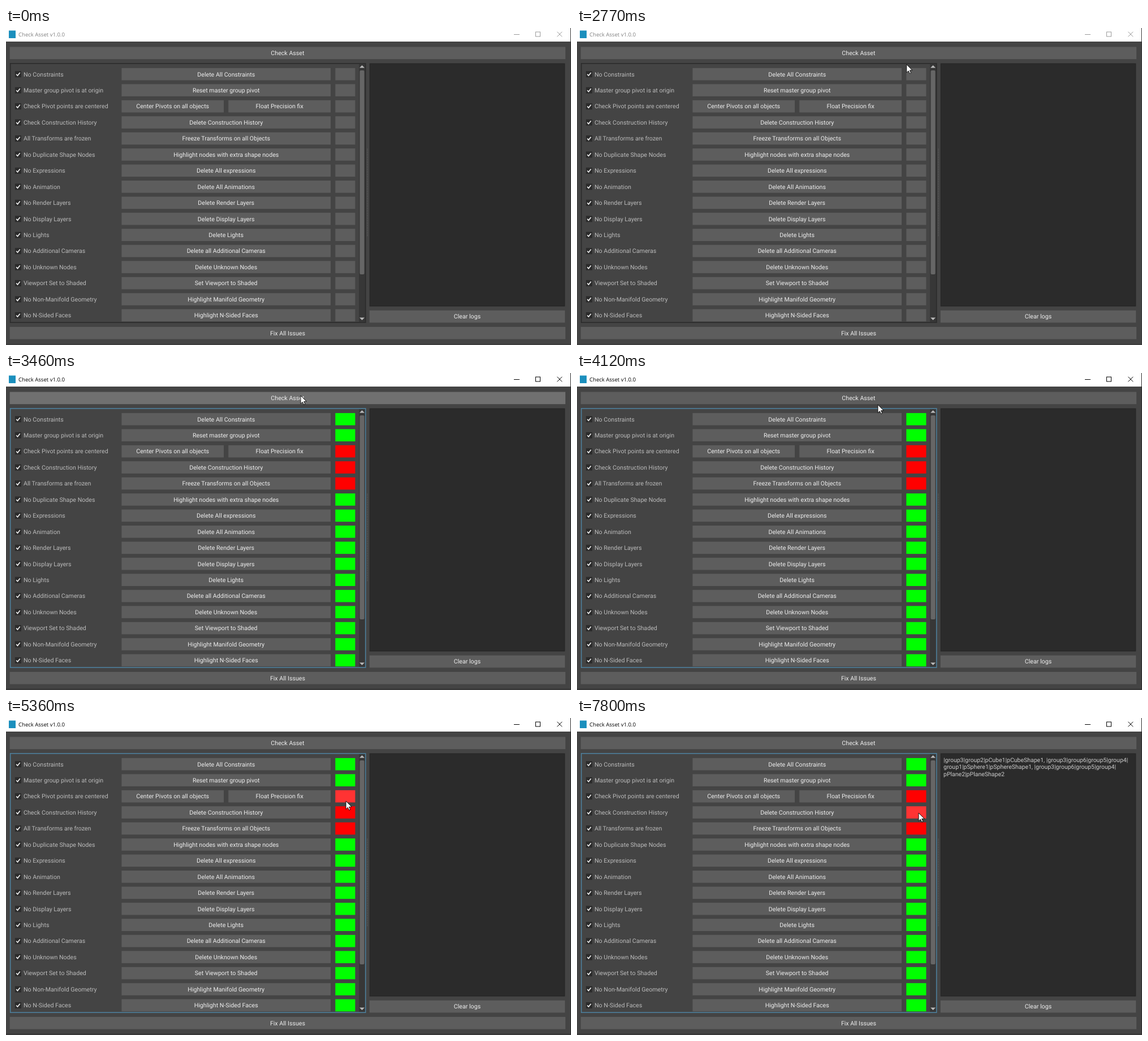
An HTML page with a canvas for the animation above (8000 ms loop, 999 by 561 pixels).

```html
<!DOCTYPE html>
<html lang="en">
<head>
<meta charset="utf-8">
<title>Check Asset</title>
<style>
html, body { margin: 0; width: 100%; height: 100%; overflow: hidden; background: #444; }
canvas { display: block; }
</style>
</head>
<body>
<canvas id="stage" width="999" height="561"></canvas>
<script>
const ctx = document.getElementById('stage').getContext('2d');
const LOOP = 8000;
const UI_FONT = '10.65px Roboto, Arial, sans-serif';
const LOG_FONT = '10.5px Roboto, Arial, sans-serif';
const TITLE_FONT = '9.55px "Open Sans", "Noto Sans", sans-serif';
const FACE = '#5d5d5d', HOVER = '#707070', DOWN = '#1d1d1d';
const ROW_TOP = 70.9, ROW_PITCH = 28.45, BTN_H = 21.6;

const ROWS = [
  ['No Constraints', 'Delete All Constraints'],
  ['Master group pivot is at origin', 'Reset master group pivot'],
  ['Check Pivot points are centered', 'Center Pivots on all objects', 'Float Precision fix'],
  ['Check Construction History', 'Delete Construction History'],
  ['All Transforms are frozen', 'Freeze Transforms on all Objects'],
  ['No Duplicate Shape Nodes', 'Highlight nodes with extra shape nodes'],
  ['No Expressions', 'Delete All expressions'],
  ['No Animation', 'Delete All Animations'],
  ['No Render Layers', 'Delete Render Layers'],
  ['No Display Layers', 'Delete Display Layers'],
  ['No Lights', 'Delete Lights'],
  ['No Additional Cameras', 'Delete all Additional Cameras'],
  ['No Unknown Nodes', 'Delete Unknown Nodes'],
  ['Viewport Set to Shaded', 'Set Viewport to Shaded'],
  ['No Non-Manifold Geometry', 'Highlight Manifold Geometry'],
  ['No N-Sided Faces', 'Highlight N-Sided Faces']
];
const LOG = [
  '|group3|group2|pCube1|pCubeShape1, |group3|group6|group5|group4|',
  'group1|pSphere1|pSphereShape1, |group3|group6|group5|group4|',
  'pPlane2|pPlaneShape2'
];

// Pointer moves: start, end, number of steps, evenly timed path points
const MOVES = [
  [2370, 3120, 12, [[760, 118], [640, 85], [570, 60], [535, 47], [521, 40]]],
  [4050, 4810, 12, [[524.5, 46], [545, 74], [558, 95], [569, 111], [577, 122]]],
  [4880, 5440, 9, [[580, 125], [590, 134], [597, 142], [601, 147], [602, 150.5]]],
  [5620, 5690, 2, [[602, 149], [602, 148]]],
  [5960, 6380, 7, [[602, 150], [603, 159], [603, 165]]],
  [6670, 6720, 2, [[603, 166], [603, 166]]],
  [7670, 7800, 2, [[603, 167], [604, 168]]]
];
const CLICKS = [[3320, 3460], [6520, 6670]];

function pointerAt(t) {
  const move = MOVES.filter(m => t >= m[0]).pop();
  if (!move) return null;
  const [start, end, steps, pts] = move;
  const step = Math.min(steps - 1, Math.floor((t - start) / (end - start) * (steps - 1) + 1e-6));
  const pos = step / (steps - 1) * (pts.length - 1);
  const i = Math.min(pts.length - 2, Math.floor(pos)), f = pos - i;
  const [a, b] = [pts[i], pts[i + 1]];
  return { x: a[0] + (b[0] - a[0]) * f, y: a[1] + (b[1] - a[1]) * f };
}

function box(x, y, w, h, color) {
  ctx.fillStyle = color;
  ctx.fillRect(x, y, w, h);
}

function line(color, width, ...pts) {
  ctx.strokeStyle = color;
  ctx.lineWidth = width;
  ctx.beginPath();
  pts.forEach(p => ctx.lineTo(p[0], p[1]));
  ctx.stroke();
}

function shape(color, ...pts) {
  ctx.fillStyle = color;
  ctx.beginPath();
  pts.forEach(p => ctx.lineTo(p[0], p[1]));
  ctx.closePath();
  ctx.fill();
}

function text(str, x, y, color, align = 'left', font = UI_FONT) {
  ctx.font = font;
  ctx.textAlign = align;
  ctx.fillStyle = color;
  ctx.fillText(str, x, y);
}

function button(left, right, y, label, s, colors = [FACE, HOVER, DOWN]) {
  const p = s.pointer;
  const over = p && p.x >= left && p.x < right + .5 && p.y >= y && p.y < y + BTN_H + .5;
  box(left, y, right - left, BTN_H, colors[over ? (s.pressed ? 2 : 1) : 0]);
  text(label, (left + right) / 2, y + 14.6, '#eee', 'center');
}

function titleBar(active) {
  const ink = active ? '#000' : '#999';
  box(0, 0, 999, 24, '#fff');
  box(5, 4.5, 12, 13.5, '#1b8fbd');
  text('Check Asset v1.0.0', 22, 14.5, active ? '#000' : '#808080', 'left', TITLE_FONT);
  line(ink, 1, [898, 11.5], [908, 11.5]);
  ctx.strokeRect(936.5, 7, 8, 8);
  line(ink, 1, [974.5, 6.7], [983.2, 15.4]);
  line(ink, 1, [974.5, 15.4], [983.2, 6.7]);
}

function checkbox(x, y) {
  box(x, y, 11, 11, '#2b2b2b');
  line('#eee', 1.7, [x + 2.3, y + 5.5], [x + 4.6, y + 8], [x + 8.8, y + 2.6]);
}

function rows(s) {
  ROWS.forEach(([label, first, second], i) => {
    const y = ROW_TOP + ROW_PITCH * i;
    checkbox(15.9, y + 5.4);
    text(label, 31, y + 14.6, '#bbb');
    button(204.4, second ? 385 : 574, y, first, s);
    if (second) button(393.2, 574, y, second, s);
    const bad = i > 1 && i < 5;
    const colors = !s.checked ? undefined
      : bad ? ['#f00', '#f33', '#500000'] : ['#0f0', '#3f3', '#005000'];
    button(582.3, 617.4, y, '', s, colors);
  });
}

function scrollBar() {
  box(624, 64, 11, 456, '#373737');
  ctx.fillStyle = '#666';
  ctx.beginPath();
  ctx.roundRect(625.5, 75, 8, 361, 2);
  ctx.fill();
  shape('#bbb', [625, 70.5], [629.5, 66], [634, 70.5]);
  shape('#bbb', [625, 512.5], [629.5, 517], [634, 512.5]);
}

function logPanel(t) {
  box(642.7, 62.5, 345.6, 430.2, '#272727');
  box(644, 64, 343, 427, '#2b2b2b');
  if (t < 6720) return;
  LOG.forEach((str, i) => text(str, 648, 77.6 + 12.55 * i, '#ccc', 'left', LOG_FONT));
}

function pointer({ x, y }, pressed) {
  if (pressed) {
    ctx.fillStyle = 'rgba(200,182,16,.88)';
    ctx.beginPath();
    ctx.arc(x - .5, y - .5, 12.5, 0, Math.PI * 2);
    ctx.fill();
  }
  const pts = [[0, 0], [0, 14.4], [3.3, 11.3], [5.6, 16.1], [7.8, 15.1], [5.7, 10.4], [10.2, 10.2]]
    .map(p => [x + p[0], y + p[1]]);
  shape('#fff', ...pts);
  line('#000', .9, ...pts, pts[0]);
}

function draw(t) {
  const active = t >= 3320;
  const s = {
    pointer: pointerAt(t),
    pressed: CLICKS.some(c => t >= c[0] && t < c[1]),
    checked: t >= 3460
  };
  ctx.textRendering = 'geometricPrecision';
  box(0, 0, 999, 561, '#444');
  titleBar(active);
  button(6.7, 989.1, 33.5, 'Check Asset', s);
  rows(s);
  scrollBar();
  ctx.strokeStyle = active ? '#4d7f9b' : '#2b2b2b';
  ctx.lineWidth = 1.6;
  ctx.strokeRect(7.7, 62.8, 628, 458.4);
  for (let y = 214; y < 368; y += 3) box(638.5, y, 1, 1, '#777');
  logPanel(t);
  button(642.7, 988.3, 499.8, 'Clear logs', s);
  button(6.7, 989.1, 529, 'Fix All Issues', s);
  const edge = active ? '#2b2b2b' : '#383838';
  box(0, 559, 999, 1, edge);
  box(998, 0, 1, 560, edge);
  if (s.pointer) pointer(s.pointer, s.pressed);
}

const began = performance.now();
function tick() {
  draw((performance.now() - began) % LOOP);
  requestAnimationFrame(tick);
}
tick();
</script>
</body>
</html>
```
